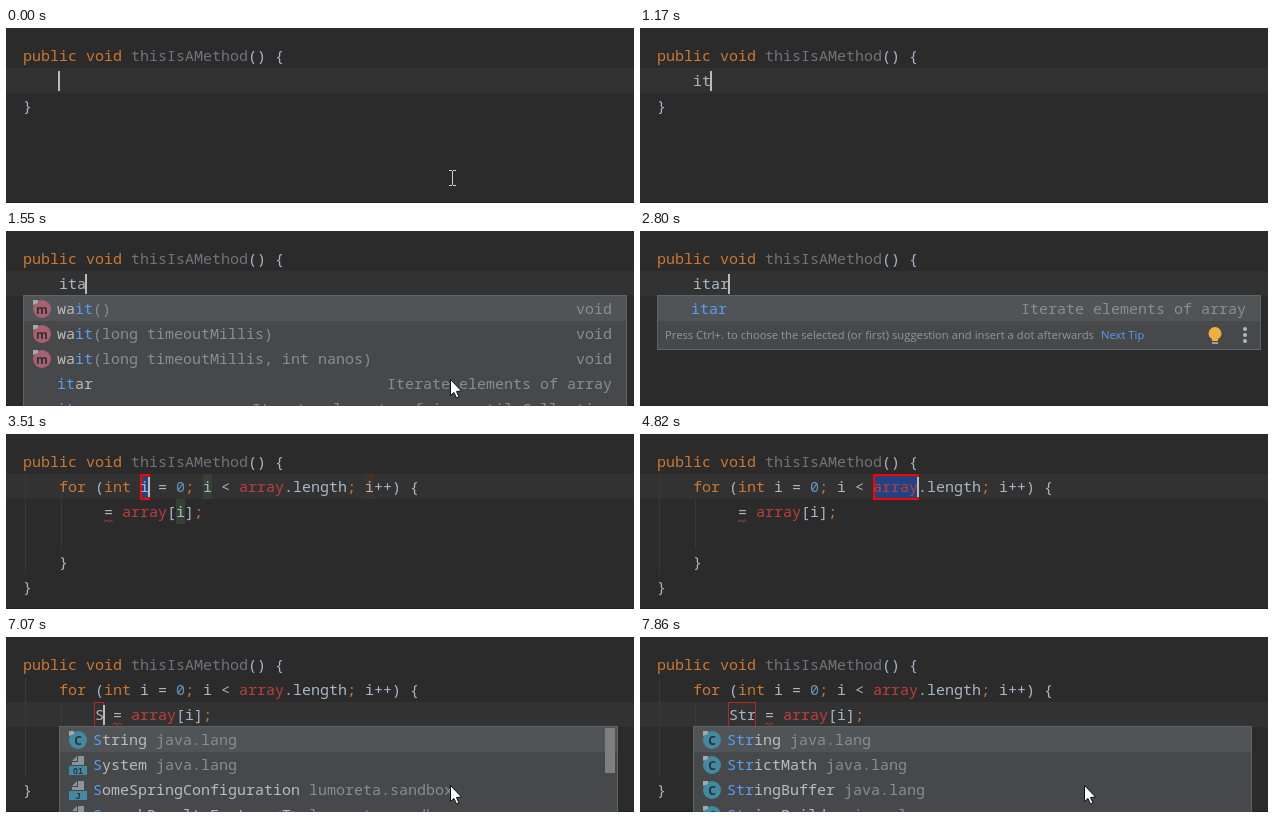
Write an HTML page with a canvas that moves like this. It is 628 px wide and 175 px high and loops after 8 s.

```html
<!DOCTYPE html>
<html lang="en">
<head>
<meta charset="utf-8">
<title>Code completion</title>
<style>
html, body { margin: 0; width: 100%; height: 100%; overflow: hidden; background: #2b2b2b; }
canvas { display: block; width: 628px; height: 175px; }
</style>
</head>
<body>
<canvas id="stage" width="628" height="175"></canvas>
<script>
const ctx = document.getElementById('stage').getContext('2d', { alpha: false });
const LOOP = 8000, CHAR = 9, ROW = 25, LEFT = 17;
const MONO = '15px "Noto Sans Mono", monospace';
const SANS = '11.25px "Open Sans", sans-serif';
const C = {
  back: '#2b2b2b', caretRow: '#323232', guide: '#393939', caret: '#bbbbbb',
  key: '#cc7832', code: '#a9b7c6', unused: '#72737a', error: '#bc3f3c', num: '#6897bb',
  popup: '#46484a', chosen: '#505456', border: '#616365', scroll: '#7e7f80',
  item: '#bbbbbb', dim: '#8c8c8c', tip: '#969696', match: '#589df6',
  page: '#89949b', teal: '#428aa4', bulb: '#f2ad3c'
};

const rect = (x, y, w, h, color) => { ctx.fillStyle = color; ctx.fillRect(x, y, w, h); };
const colX = col => LEFT + col * CHAR;
const rowY = row => 15 + row * ROW;

function frame(x, y, w, h, color, line = 1) {
  ctx.strokeStyle = color;
  ctx.lineWidth = line;
  ctx.strokeRect(x + line / 2, y + line / 2, w - line, h - line);
}

function dot(x, y, r, color) {
  ctx.fillStyle = color;
  ctx.beginPath();
  ctx.arc(x, y, r, 0, 7);
  ctx.fill();
}

function path(x, y, points, fill, stroke) {
  ctx.beginPath();
  points.forEach(([dx, dy]) => ctx.lineTo(x + dx, y + dy));
  if (fill) { ctx.closePath(); ctx.fillStyle = fill; ctx.fill(); }
  if (stroke) { ctx.strokeStyle = stroke; ctx.lineWidth = 1; ctx.stroke(); }
}

function label(str, x, y, color, font, align = 'left') {
  ctx.font = font;
  ctx.textAlign = align;
  ctx.fillStyle = color;
  ctx.fillText(str, x, y);
}

// Parts alternate: colour name, string, colour name, string...
function text(x, baseline, ...parts) {
  for (let i = 0; i < parts.length; i += 2) {
    label(parts[i + 1], x, baseline, C[parts[i]], MONO);
    x += parts[i + 1].length * CHAR;
  }
}
const code = (col, row, ...parts) => text(colX(col), rowY(row) + 18, ...parts);

function caret(col, row) {
  rect(colX(col) - 1, rowY(row) + 3, 2, 20, C.caret);
}

function wave(x, y) {
  path(x, y, [0, 1, 2, 3, 4].map(i => [i * 2.2, i % 2 ? -2 : 0]), null, C.error);
}

function roundIcon(x, y, letter, color) {
  dot(x, y, 9, color);
  label(letter, x, y + 4.5, '#2c3236', 'bold 12px "Open Sans", sans-serif', 'center');
  path(x, y, [[-9, -9], [-4, -9], [-4, -6], [-9, -4]], '#a4a8aa');
}

function fileIcon(x, y, mark) {
  path(x, y, [[-1, -9], [-1, -4], [-6, -4]], C.page);
  path(x, y, [[0, -9], [6, -9], [6, 0], [-6, 0], [-6, -3], [0, -3]], C.page);
  rect(x - 9, y + 1, 18, 9, C.teal);
  label(mark, x, y + 9, '#2c3236', 'bold 9px "Liberation Sans", sans-serif', 'center');
}

// The border's top edge sits on the pixel row above the first item.
function popup(x, y, w, h) {
  rect(x, y - 1, w, h + 1, C.popup);
  rect(x, y, w, ROW, C.chosen);
  frame(x, y - 1, w, h + 1, C.border);
}

function templatePopup() {
  popup(17, 65, 604, 140);
  ['()', '(long timeoutMillis)', '(long timeoutMillis, int nanos)'].forEach((args, i) => {
    const y = 78 + i * ROW;
    roundIcon(36, y, 'm', '#a9606f');
    text(51, y + 5, 'item', 'wa', 'match', 'it', 'dim', args);
    label('void', 606, y + 5, C.dim, MONO, 'right');
  });
  [['ar', 'array'], ['co', 'java.util.Collection']].forEach(([end, what], i) => {
    const y = 158 + i * ROW;
    text(51, y, 'match', 'it', 'item', end);
    label('Iterate elements of ' + what, 606, y, C.dim, MONO, 'right');
  });
}

function tipPopup(typed, bulb) {
  popup(17, 65, 604, 54);
  text(51, 83, 'match', typed, 'item', 'itar'.slice(typed.length));
  label('Iterate elements of array', 606, 83, C.dim, MONO, 'right');
  label('Press Ctrl+. to choose the selected (or first) suggestion and insert a dot afterwards',
    25, 108, C.tip, SANS);
  label('Next Tip', 461, 108, C.match, SANS);
  for (const y of [98, 104, 110]) dot(605, y, 2, '#b4b6b8');
  if (bulb) {
    dot(575, 102.5, 6.5, C.bulb);
    rect(572, 106, 6, 4, C.bulb);
    rect(572, 111, 6, 2, '#a0a2a4');
  }
}

function typePopup(prefix, items, scrollbar) {
  popup(53, 90, 559, 110);
  items.forEach(([name, place, mark], i) => {
    const y = 103 + i * ROW;
    mark ? fileIcon(72, y, mark) : roundIcon(72, y, 'C', C.teal);
    text(87, y + 5, 'match', prefix, 'item', name.slice(prefix.length), 'dim', ' ' + place);
  });
  if (scrollbar) rect(599, 91, 10, 45, C.scroll);
}

function arrow() {
  path(444.5, 148.5, [[0, 0], [0, 16], [3.5, 13], [6, 18.5], [8.5, 17.5], [6, 12], [11, 11.5], [0, 0]],
    '#ffffff', '#101010');
}

function beam() {
  rect(446, 143, 1, 14, '#d0d0d0');
  for (const y of [142, 157]) {
    rect(443, y, 3, 1, '#d0d0d0');
    rect(447, y, 3, 1, '#d0d0d0');
  }
}

function abbreviation(t) {
  const typed = 'itar'.slice(0, [1020, 1170, 1550, 1780].filter(at => t >= at).length);
  code(4, 1, 'code', typed);
  code(0, 2, 'code', '}');
  if (t >= 1250 && t < 1630) templatePopup();
  else if (t >= 1630 && t < 3110) tipPopup(typed, t >= 2330);
  const hidden = (t >= 320 && t < 850) || (t >= 2330 && t < 2800);
  if (!hidden) caret(4 + typed.length, 1);
}

function loop(t) {
  rect(19, 40, 1, 100, C.guide);
  rect(55, 65, 1, 50, C.guide);

  const typed = 'Str'.slice(0, [6840, 7240, 7310].filter(at => t >= at).length);
  const onType = t >= 5990, onArray = t >= 4580 && !onType;
  const name = t >= 3430 ? 'error' : 'code';

  if (t >= 3510 && t < 4820) {
    if (!onArray) rect(colX(20), 40, CHAR, ROW, '#344134');
    rect(colX(17), 65, CHAR, ROW, '#344134');
    if (!onArray) rect(colX(38), 40, CHAR, ROW, '#40332b');
  }
  if (!onType) {
    const [col, size] = onArray ? [24, 5] : [13, 1];
    rect(colX(col), 40, size * CHAR, ROW, '#214283');
    frame(colX(col), 40, size * CHAR + 1, 26, '#ff0000', 2);
  }

  code(4, 1, 'key', 'for ', 'code', '(', 'key', 'int ', 'code', 'i = ', 'num', '0', 'key', '; ',
    'code', 'i < ', name, 'array', 'code', '.length', 'key', '; ', 'code', 'i++) {');
  code(8, 2, 'code', typed + ' = ', name, 'array', 'code', '[i]', 'key', ';');
  code(4, 4, 'code', '}');
  code(0, 5, 'code', '}');
  if (t >= 3510) wave(colX(9 + typed.length), 88);

  if (onType) {
    if (typed) frame(88, 65, typed.length * CHAR + 1, 26, '#b52626');
    else rect(88, 65, 1, 26, '#ff0000');
  }
  if (t >= 7390) {
    typePopup('Str', ['String', 'StrictMath', 'StringBuffer', 'StringBuilder']
      .map(type => [type, 'java.lang']));
  } else if (t >= 7070) {
    typePopup('S', [['String', 'java.lang'], ['System', 'java.lang', '01'],
      ['SomeSpringConfiguration', 'lumoreta.sandbox', 'J'],
      ['SearchResultsFactory<T>', 'lumoreta.sandbox', 'J']], true);
  }

  if (onType) {
    if (t < 7860) caret(8 + typed.length, 2);
  } else if (onArray) {
    if (t < 5830) caret(29, 1);
  } else if (t < 4350) {
    caret(14, 1);
  }
}

function draw(t) {
  rect(0, 0, 628, 175, C.back);
  rect(0, rowY(t < 5990 ? 1 : 2), 628, ROW, C.caretRow);
  rect(0, 174, 628, 1, '#242424');
  code(0, 0, 'key', 'public void ', 'unused', 'thisIsAMethod', 'code', '() {');
  t < 3190 ? abbreviation(t) : loop(t);
  if (t < 1020 || (t >= 1630 && t < 1780)) beam();
  if ((t >= 1250 && t < 1630) || t >= 7070) arrow();
}

const start = performance.now();
function tick() {
  draw((performance.now() - start) % LOOP);
  requestAnimationFrame(tick);
}
tick();
</script>
</body>
</html>
```
